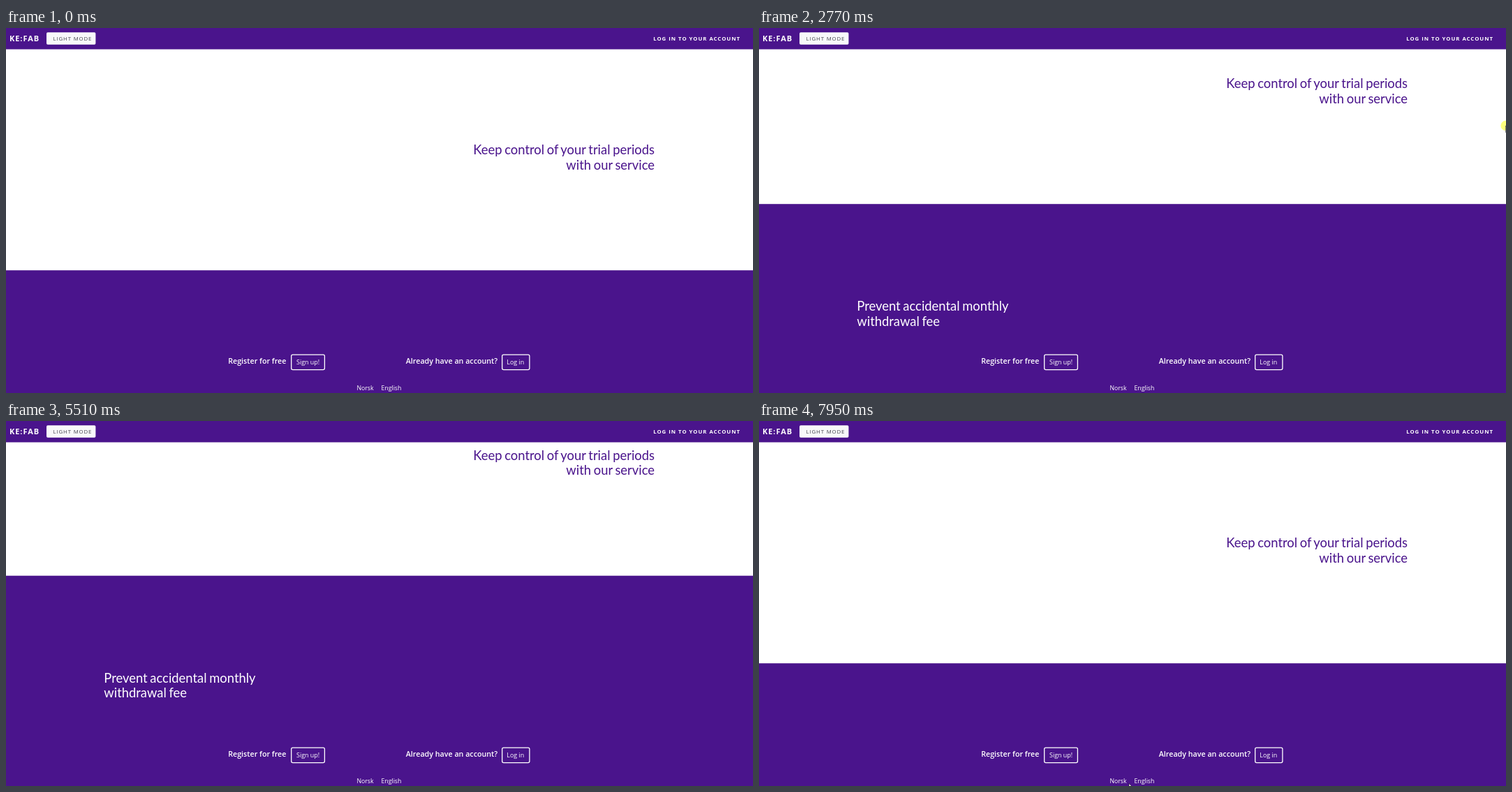
An HTML page that plays this animation: 1070x523 px, repeating every 8000 ms.

```html
<!DOCTYPE html>
<html lang="en">
<head>
<meta charset="utf-8">
<title>Trial periods landing page</title>
<style>
  html, body { margin: 0; width: 100%; height: 100%; overflow: hidden; background: #fff; }
  svg { display: block; width: 1070px; height: 523px; }
  text { font-family: "Open Sans", "Noto Sans", sans-serif; fill: #fff; white-space: pre; }
  .purple { fill: #4a148c; }
  .heading text { font: 18.4px Lato, sans-serif; word-spacing: -1px; }
  .heading .dark { fill: #4a148c; text-anchor: end; }
  .brand { font-size: 11px; font-weight: 700; letter-spacing: .95px; }
  .mode { font-size: 7.8px; letter-spacing: .85px; fill: #45454f; }
  .account { font-size: 7.8px; font-weight: 700; letter-spacing: .97px; }
  .prompt { font-size: 10.7px; font-weight: 600; }
  .button { font-size: 8.95px; }
  .language { font-size: 8.75px; }
  .outline { fill: none; stroke: #fff; stroke-width: 1.3; }
</style>
</head>
<body>
<svg viewBox="0 0 1070 523">
  <rect width="1070" height="523" fill="#fff"/>

  <!-- Page content; y = 0 is the boundary between the two sections -->
  <g id="page" class="heading">
    <rect class="purple" width="1070" height="523"/>
    <text class="dark" x="929" y="-165.8">Keep control of your trial periods</text>
    <text class="dark" x="929" y="-144.3">with our service</text>
    <text x="140.3" y="153">Prevent accidental monthly</text>
    <text x="140.3" y="174.5">withdrawal fee</text>
  </g>

  <g id="header">
    <rect class="purple" width="1070" height="30.5"/>
    <text class="brand" x="5" y="19">KE:FAB</text>
    <rect x="58" y="6.3" width="70.4" height="17.4" rx="1.8" fill="#f8f9fa"/>
    <text class="mode" x="67.6" y="18">LIGHT MODE</text>
    <text class="account" x="927.2" y="18">LOG IN TO YOUR ACCOUNT</text>
  </g>

  <g id="footer">
    <rect class="purple" y="450" width="1070" height="73"/>
    <text class="prompt" x="318.2" y="481">Register for free</text>
    <rect class="outline" x="408.7" y="468.2" width="47.7" height="21.4" rx="2"/>
    <text class="button" x="416" y="482.3">Sign up!</text>
    <text class="prompt" x="572.8" y="481">Already have an account?</text>
    <rect class="outline" x="710.7" y="468.2" width="39.2" height="21.4" rx="2"/>
    <text class="button" x="717.3" y="482.3">Log in</text>
    <text class="language" x="502.4" y="518.6">Norsk</text>
    <text class="language" x="537.4" y="518.6">English</text>
  </g>

  <g id="cursor">
    <circle id="halo" r="7.1" fill="#ffff7d"/>
    <path d="M0 0V9.6L2.2 7.5 3.7 10.9 5.1 10.3 3.6 7H6.7Z" fill="#fff" stroke="#000" stroke-width=".5"/>
  </g>
</svg>
<script>
const LOOP = 8000;
const TOP = 347.2;

// Bursts of motion: first step, last step, number of steps
const BURSTS = [
  [220, 670, 7], [1750, 2540, 11], [2620, 3400, 11], [3480, 3950, 7],
  [5110, 5910, 11], [5960, 6670, 10], [7220, 7950, 10]
];

// Section boundary: scrolled down, then back up
const BOUNDARY = [
  [1670, TOP], [1750, 343], [2145, 310.4], [2540, 264], [2776, 252.2], [3400, 163], [3950, 130.5],
  [5030, 130.5], [5510, 221.7], [5910, 265.5], [6354, 328.6], [6670, TOP]
];
const DRAG_X = [[1750, 1072], [2145, 1071], [2776, 1069.5], [3300, 1071], [3900, 1079]];

const page = document.getElementById("page");
const cursor = document.getElementById("cursor");
const halo = document.getElementById("halo");

function track(keys, t) {
  if (t <= keys[0][0]) return keys[0][1];
  for (let i = 1; i < keys.length; i++) {
    const [t0, v0] = keys[i - 1], [t1, v1] = keys[i];
    if (t <= t1) return v0 + (v1 - v0) * (t - t0) / (t1 - t0);
  }
  return keys[keys.length - 1][1];
}

function stepTime(t) {
  const tolerance = 8;
  let held = 0;
  for (const [start, end, count] of BURSTS) {
    if (t < start) break;
    const gap = (end - start) / (count - 1);
    held = start + gap * Math.min(count - 1, Math.floor((t - start + tolerance) / gap));
  }
  return held;
}

function cursorAt(t, boundary) {
  if (t >= 220 && t < 660) {
    const p = (t - 220) / 375;
    return { x: 1053.3 + 24 * (p - .5) ** 2, y: 501 - 277 * p };
  }
  if (t >= 1750 && t < 3900) {
    return { x: track(DRAG_X, t), y: 76.2 + (TOP - boundary) / 1.49, pressed: true };
  }
  if (t >= 7220) {
    const p = (t - 7220) / 730;
    const eased = p * p * (3 - 2 * p);
    return { x: 1060 - 530 * eased, y: 124.5 + 395 * eased };
  }
  return null;
}

function place(node, x, y) {
  node.setAttribute("transform", `translate(${x} ${y})`);
}

function draw(now) {
  const t = stepTime(now % LOOP);
  const boundary = track(BOUNDARY, t);
  place(page, 0, boundary);

  const pointer = cursorAt(t, boundary);
  cursor.style.display = pointer ? "" : "none";
  if (pointer) {
    place(cursor, pointer.x, pointer.y);
    halo.style.display = pointer.pressed ? "" : "none";
  }
}

const begin = performance.now();
function frame() {
  draw(performance.now() - begin);
  requestAnimationFrame(frame);
}
frame();
</script>
</body>
</html>
```
